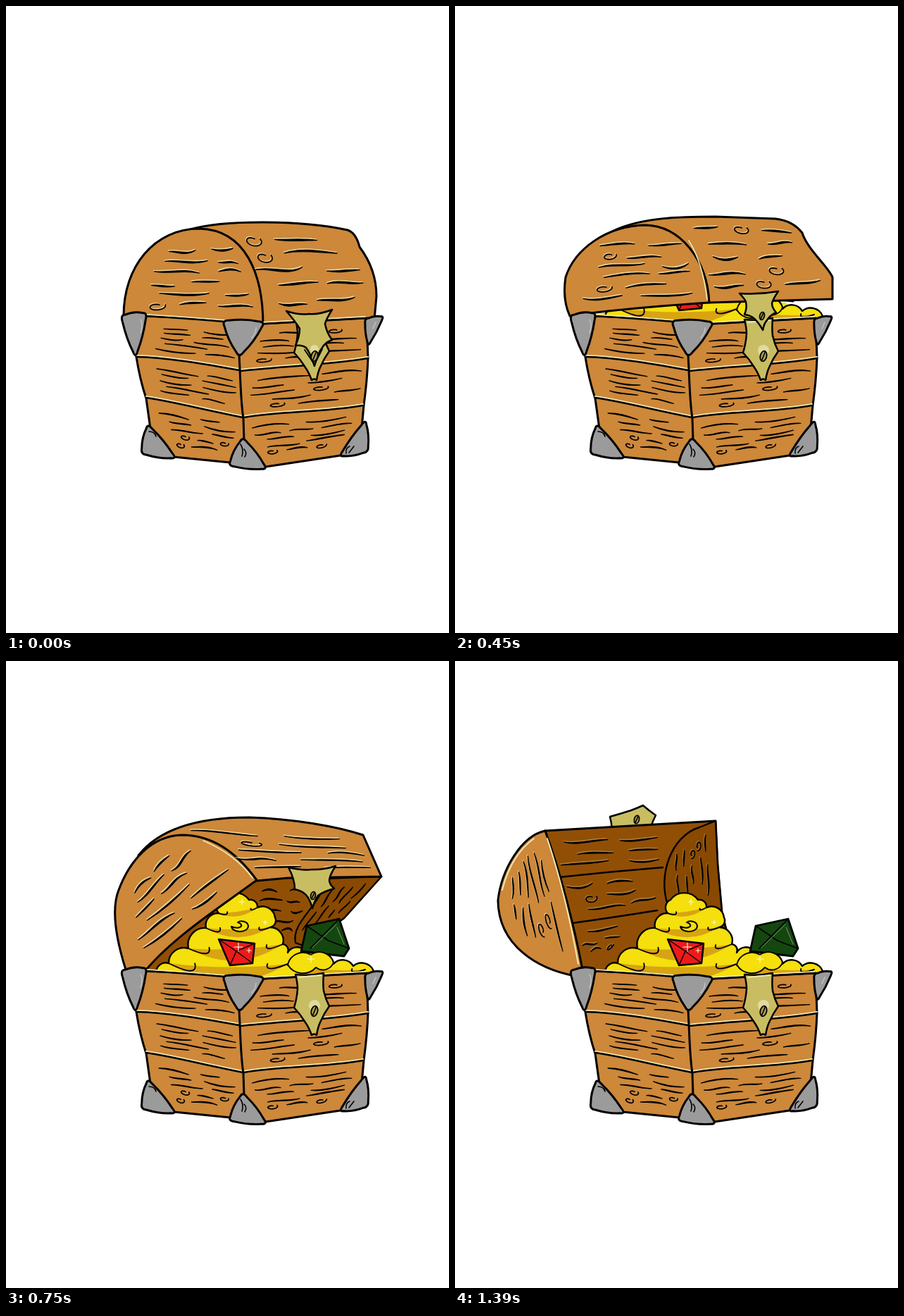
Recreate the animation shown at these times as an HTML page. Size 629 by 890 pixels, loop 1.55 s.

```html
<!DOCTYPE html>
<html lang="en">
<head>
<meta charset="utf-8">
<title>Treasure chest</title>
<style>
  html, body { margin: 0; width: 100%; height: 100%; overflow: hidden; background: #fff; }
  svg { display: block; width: 100%; height: 100%; stroke-linecap: round; stroke-linejoin: round; }
</style>
</head>
<body>
<svg id="stage" viewBox="0 0 629 890"></svg>
<script>
const WOOD = '#cd883a', DARK = '#914f06', SIDE = '#894900', GOLD = '#f5df0c', SHADE = '#d8a413',
      STEEL = '#9b9b9b', BRASS = '#c8bd62', CREAM = '#eee8b4', INK = '#000';

const shape = (d, fill, w = 3) =>
  `<path d="${d}" fill="${fill}" stroke="${w ? INK : 'none'}" stroke-width="${w}"/>`;
const line = (d, w = 2.4, color = INK) =>
  `<path d="${d}" fill="none" stroke="${color}" stroke-width="${w}"/>`;
const glint = (d, w = 1.6) => line(d, w, CREAM);
const seam = d => `<g transform="translate(0 -2)">${glint(d, 2)}</g>` + line(d, 2.6);

// "x y x y" to a list of points
const points = text => {
  const v = text.split(' ').map(Number);
  return v.filter((_, i) => i % 2 === 0).map((x, i) => [x, v[2 * i + 1]]);
};
const mix = (a, b, t) => [a[0] + (b[0] - a[0]) * t, a[1] + (b[1] - a[1]) * t];
const centre = pts => [0, 1].map(k => pts.reduce((sum, p) => sum + p[k], 0) / pts.length);

function random(seed) {
  let s = seed * 7919 + 17;
  return (a = 0, b = 1) => {
    s = (s * 16807) % 2147483647;
    return a + (b - a) * s / 2147483647;
  };
}

// Wood grain: rows of tapered strokes and a few knots, running along the top side of a quad.
function grain(quad, rows, seed, lit = 0) {
  const [a, b, c, d] = points(quad), rnd = random(seed);
  const at = (u, v) => mix(mix(a, b, u), mix(d, c, u), v).map(n => n.toFixed(1)).join(' ');
  const step = 1 / rows;
  let strokes = '', knots = '';
  rnd();
  for (let r = 0; r < rows; r++) {
    let u = rnd(0, .22);
    while (u < .8) {
      const len = Math.min(rnd(.22, .5), 1 - u), v = (r + rnd(.35, .65)) * step;
      if (rnd() < .13) {
        const mid = u + .08;
        knots += 'M' + Array.from({ length: 15 }, (_, i) => {
          const t = i / 14, ang = 5.8 * t - .4, rad = 1 - .55 * t;
          return at(mid + .08 * rad * Math.cos(ang), v + .38 * step * rad * Math.sin(ang));
        }).join('L');
        u += .28;
        continue;
      }
      const w1 = rnd(-.4, .4) * step, w2 = rnd(-.4, .4) * step, fat = .055 * step + .004;
      const start = at(u, v), end = at(u + len, v + rnd(-.2, .2) * step);
      const bend = (t, w, side) => at(u + len * t, v + w + side * fat);
      strokes += `M${start}C${bend(.33, w1, 1)} ${bend(.66, w2, 1)} ${end}` +
                 `C${bend(.66, w2, -1)} ${bend(.33, w1, -1)} ${start}Z`;
      u += len + rnd(.08, .22);
    }
  }
  const light = `<g transform="translate(-1 -1.6)" opacity="${lit}">${shape(strokes, CREAM, 0)}${glint(strokes + knots, 1.2)}</g>`;
  return (lit ? light : '') + shape(strokes, INK, 1.3) + line(knots, 1.7);
}

// Closed outline with rounded corners and slightly bulging sides.
function plate(text) {
  const p = points(text), n = p.length, mid = centre(p);
  const d = p.map((q, i) => {
    const prev = p[(i + n - 1) % n], next = p[(i + 1) % n];
    const bulge = mix(mid, mix(q, next, .5), 1.2), far = mix(next, q, .17);
    return `${i ? '' : 'M' + mix(q, prev, .17)}Q${q} ${mix(q, next, .17)}Q${bulge} ${far}`;
  }).join('') + 'Z';
  return shape(d, STEEL);
}

// Pointed metal piece: sides are pulled towards the middle.
function clasp(text, pull = .14) {
  const p = points(text), mid = centre(p);
  const d = 'M' + p[0] + p.map((q, i) => {
    const next = p[(i + 1) % p.length];
    return `Q${mix(mix(q, next, .5), mid, pull)} ${next}`;
  }).join('') + 'Z';
  return shape(d, BRASS, 2.5);
}
const screw = (x, y, r = 4.5) =>
  `<g transform="translate(${x} ${y}) rotate(14)"><ellipse rx="${r}" ry="${r * 1.65}" fill="#aaa04a" stroke="${INK}" stroke-width="1.8"/>` +
  line(`M1 ${-r * 1.6}L-1 ${r * 1.6}`, 1.6) + '</g>';

// Cloud outline: neighbouring points joined by round arcs.
const puff = pts => 'M' + pts[0] + pts.slice(1).map((q, i) => {
  const r = Math.hypot(q[0] - pts[i][0], q[1] - pts[i][1]) * .62;
  return `A${r} ${r} 0 0 1 ${q}`;
}).join('');

function tier(text) {
  const [a, b] = points(text), mid = mix(a, b, .5), w = b[0] - a[0];
  const dip = k => [mid[0], mid[1] + w * k];
  const curve = `M${a}Q${mix(a, dip(.25), .5)} ${mix(a, b, .22)}M${b}Q${mix(b, dip(.2), .4)} ${mix(b, a, .17)}`;
  return shape(`M${a}Q${dip(.3)} ${b}Q${dip(.06)} ${a}Z`, SHADE, 0) + line(curve, 1.9);
}
const star = (x, y, r) => line(`M${x - r} ${y}H${x + r}M${x} ${y - r}V${y + r}`, 1.1, '#fffbd8');

const heap = points('213 442 231 429 259 408 284 379 302 358 306 339 345 339 357 350 382 364 375 378 393 402 400 414 424 411 442 416 465 430 493 433 522 440');
const treasure =
  shape(puff(heap) + 'V450H213Z', GOLD, 2.4) +
  ['302 358 357 350', '284 379 375 378', '259 408 393 402', '231 429 400 430', '400 432 510 438'].map(tier).join('') +
  shape('M320 377C322 387 344 386 344 376C343 369 333 368 329 371C339 374 334 382 320 377Z', GOLD, 2) +
  shape('M427 376L473 366L487 408L480 419L419 412Z', '#14470f', 2.8) +
  line('M427 376L458 397L487 408M473 366L432 408', 1.6) +
  line('M435 407L469 374M470 378L480 402', .9, '#87a27e') +
  shape(puff(points('400 431 433 417 465 428 440 435 400 431')), GOLD, 1.9) +
  shape('M302 395L353 401L350 429L318 432Z', '#ee1a1a', 2.5) +
  line('M302 395L327 412L353 401M327 412L318 432M327 412L350 429', 1.5) +
  star(330, 406, 6) + star(345, 411, 3) + star(335, 342, 4) + star(433, 423, 5) + star(368, 371, 3);

const body =
  shape('M180 440Q250 441 310 447L366 451L512 443L514 500Q513 530 508 567L505 600L512 630L475 638L369 654L318 648L238 640L205 600L199 557Q190 530 185 498Z', WOOD) +
  ['M198 440Q250 443 310 448', 'M366 451L510 443', 'M185 498C225 499 270 506 331 517', 'M333 518C390 512 460 509 514 500',
   'M199 556C240 562 280 573 336 584', 'M338 584C390 575 450 577 507 567'].map(seam).join('') +
  line('M331 495C333 530 333 560 337 585L338 617', 3) +
  ['203 452 318 462 325 505 198 488', '200 508 325 527 328 570 206 548', '210 570 328 592 318 635 240 628',
   '366 462 505 455 503 500 342 508', '342 530 505 512 502 560 345 575', '345 596 500 578 470 625 370 640']
    .map((quad, i) => grain(quad, 5, 21 + i)).join('') +
  ['162 439 201 435 184 501', '306 446 369 448 331 500', '509 444 537 440 514 484',
   '201 592 243 643 191 636', '336 611 372 658 315 653', '511 586 515 633 472 640'].map(plate).join('') +
  line('M355 457Q355 464 349 471M191 445Q195 452 191 464M525 449L521 458', 1.3, '#c6c6c6') +
  line('M203 604Q211 604 213 611M333 622Q338 630 335 639M338 629Q343 634 339 640M483 635Q482 627 488 625M487 634L494 625', 1.6) +
  clasp('411 445 451 443 451 468 459 490 446 513 441 531 434 531 425 513 409 492 414 465', .07) +
  '<circle cx="438" cy="489" r="8" fill="#e1daa0"/>' + glint('M416 449L447 446', 2) + screw(438, 497);

const lid = (top, side, topGrain, sideGrain, seed) =>
  shape(top, WOOD) + shape(side, WOOD) + grain(topGrain, 5, seed, .8) + grain(sideGrain, 6, seed + 1, .8);

// Each pose: start time, part behind the gold, part over the gold, part over the body.
const poses = [
  { at: 0, back: '',
    front: lid('M262 317C310 303 420 304 485 318Q497 322 502 342C520 366 526 390 526 412L523 445L365 452L300 330Z',
               'M167 440C167 370 210 316 275 316C340 318 365 380 365 453L310 448Z',
               '325 318 490 326 515 425 372 435', '215 338 320 338 352 432 180 434', 3),
    over: clasp('398 433 430 437 463 431 453 451 463 474 449 485 438 511 426 485 411 482 417 458') +
      '<circle cx="438" cy="487" r="6" fill="#e1daa0"/>' + screw(438, 497) + line('M424 488L438 509L449 487', 1.8) },

  { at: 300, back: shape('M190 438L361 421H470L480 442Z', GOLD, 0),
    front: lid('M225 319C265 300 320 299 370 299L455 302Q480 305 493 322C500 345 530 370 536 385L536 416L361 421Z',
               'M163 440C156 425 154 405 157 385C170 345 215 312 270 311C320 312 358 360 361 421Q270 427 200 435Z',
               '320 308 470 310 525 400 370 410', '205 335 320 334 348 412 172 425', 5) +
      glint('M332 333Q352 365 358 417'),
    over: clasp('404 408 459 405 450 422 456 435 443 446 437 460 424 443 411 438 413 420') + screw(436, 440, 3.3) },

  { at: 550, back: shape('M185 440L335 364L500 367Q492 384 480 394L420 415L240 440Z', DARK, 2.4),
    front: lid('M186 311C230 280 300 274 345 277Q415 280 468 300L502 358Q504 365 500 367Q460 362 420 362L335 364L240 310Z',
               'M170 439C150 410 140 375 150 345C165 315 200 296 240 299C280 305 315 335 335 364C280 383 225 409 195 437Z',
               '265 287 465 305 490 355 340 356', '165 342 245 306 318 358 180 422', 7) +
      glint('M270 307Q305 325 331 358'),
    over: clasp('400 353 420 359 441 352 438 366 441 378 430 384 420 394 406 382 411 367') + screw(425, 382, 3.3) },

  { at: 750,
    back: shape('M172 440L345 300L533 306L480 365Q450 385 425 405L400 420L230 440Z', DARK, 2.6) +
      shape('M411 400C405 370 445 350 455 309L533 306L480 365L425 405Z', SIDE, 2.2) +
      grain('345 318 445 318 410 392 365 392', 5, 41) + grain('460 318 415 385 478 355 520 314', 4, 42),
    front: lid('M188 276C220 235 280 222 345 222C410 224 470 235 507 247L533 306L400 308L356 312L260 260Z',
               'M170 438C158 400 148 355 160 325C175 285 205 248 250 247C295 247 330 275 356 311C310 345 240 390 200 437Z',
               '250 235 495 252 520 297 360 300', '170 335 240 258 338 308 182 425', 9) +
      glint('M280 255Q325 274 350 308'),
    over: clasp('401 293 435 296 468 291 459 311 466 323 443 333 435 351 426 332 410 324') + screw(436, 333, 3.3) },

  { at: 950,
    back: shape('M176 440L305 278L518 274Q475 320 455 370L425 400L400 420L200 440Z', DARK, 2.6) +
      shape('M391 392C393 350 410 312 442 276L518 274Q475 320 455 370L425 400L405 402Z', SIDE, 2.2) +
      line('M280 312Q340 320 410 316M242 357Q268 361 292 357M205 401Q220 398 238 402') +
      grain('300 288 420 284 390 385 195 425', 8, 43) + grain('438 290 400 380 455 355 500 283', 5, 44),
    front: lid('M160 277C220 225 300 206 385 208Q440 210 485 222L518 274Q400 277 305 279L220 250Z',
               'M168 440C145 420 118 370 122 335C128 295 165 260 200 249C240 240 285 255 305 278C260 320 220 370 176 438Z',
               '240 234 475 228 502 266 315 268', '133 355 195 260 290 282 172 425', 11) +
      glint('M246 252Q282 260 300 279M205 250Q250 225 320 214'),
    over: clasp('372 264 400 268 438 265 426 277 431 288 411 298 403 319 390 293 366 286 378 275') + screw(403, 293, 3.5) },

  { at: 1150,
    back: clasp('223 240 220 221 250 212 267 205 285 219 278 236', .03) + screw(258, 225, 3.5) +
      shape('M128 241L370 227L373 290L379 357L395 420L230 440L180 438Z', DARK) +
      shape('M370 227L373 290L379 357L340 380L302 346C288 305 306 249 347 236Z', SIDE, 2.4) +
      line('M147 307Q220 299 295 293M167 372Q225 364 287 354', 2.6) +
      grain('140 252 305 245 288 285 152 300', 3, 45, .3) + grain('156 314 288 302 284 346 172 364', 3, 46, .3) +
      grain('174 380 270 368 230 406 186 424', 3, 47, .3) + grain('310 272 313 332 366 345 362 242', 5, 48, .3),
    front: shape('M170 447C118 437 62 405 61 340C66 295 95 248 128 241C150 300 170 380 181 438Z', WOOD) +
      grain('120 255 166 432 80 375 78 300', 6, 13, .8) + glint('M131 252Q157 330 175 430M67 325Q80 275 112 252', 2),
    over: '' }
];

const LOOP = 1550;
const stage = document.getElementById('stage');
const layer = key => poses.map((p, i) => `<g data-on="${i}">${p[key]}</g>`).join('');
stage.innerHTML = layer('back') + `<g data-on="1 2 3 4 5">${treasure}</g>` + layer('front') + body + layer('over');

for (const g of stage.querySelectorAll('[data-on]')) {
  const on = g.dataset.on.split(' ').map(Number);
  const steps = poses.map((p, i) => ({ offset: p.at / LOOP, opacity: on.includes(i) ? 1 : 0, easing: 'steps(1, end)' }));
  steps.push({ offset: 1, opacity: steps[steps.length - 1].opacity });
  g.animate(steps, { duration: LOOP, iterations: Infinity });
}
</script>
</body>
</html>
```
